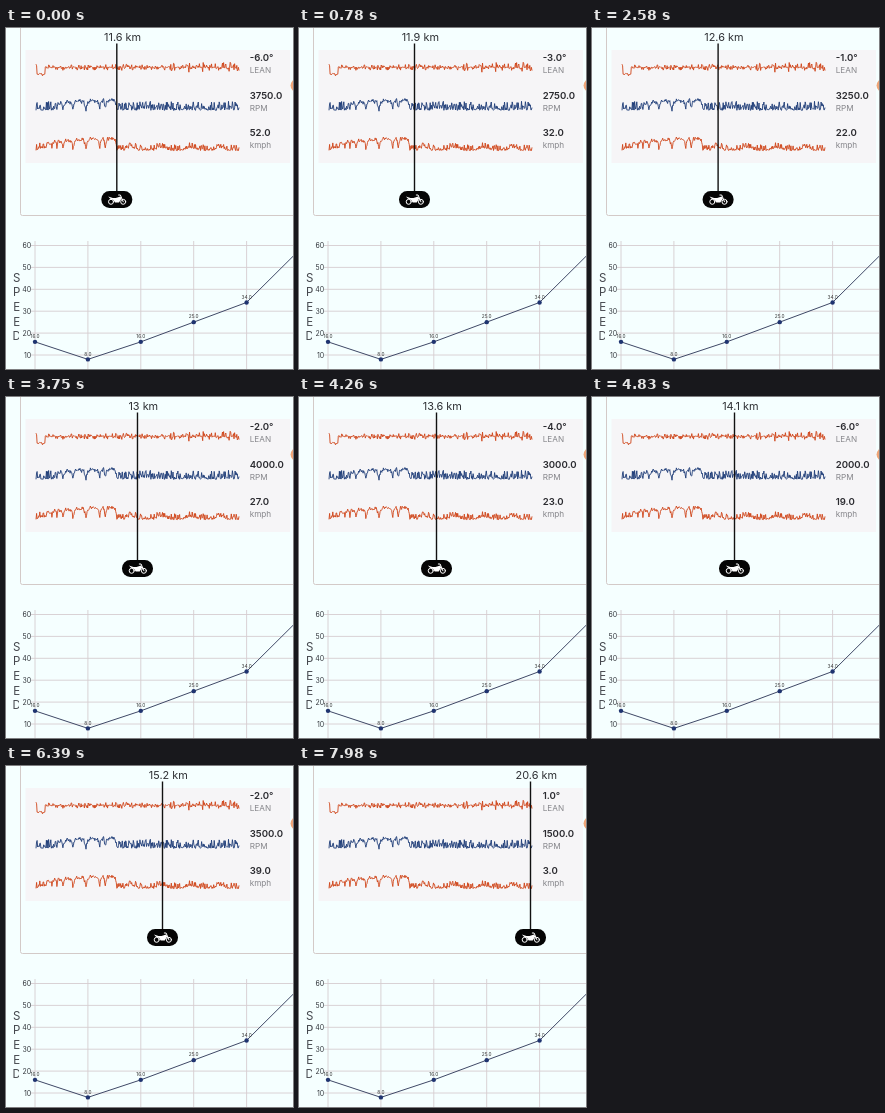
Recreate the animation shown at these times as an HTML page. Size 287 by 341 pixels, loop 8 s.

```html
<!DOCTYPE html>
<html lang="en">
<head>
<meta charset="utf-8">
<title>Ride telemetry</title>
<style>
  html, body { margin: 0; width: 100%; height: 100%; overflow: hidden; background: #f5ffff; }
  svg { display: block; width: 100vw; height: 100vh; font-family: Inter, Roboto, sans-serif; }
  .value { font-size: 9.6px; font-weight: 600; fill: #2b2b30; }
  .unit { font-size: 8.2px; fill: #85858a; }
  .km { font-size: 10.9px; fill: #2e3034; text-anchor: middle; }
  .tick { font-size: 7px; fill: #33373d; text-anchor: end; }
  .dot-label { font-size: 4.8px; fill: #333; text-anchor: middle; }
  .axis { font-size: 11.5px; fill: #45484e; text-anchor: middle; }
  .grid { stroke: #d6cdd1; stroke-width: .9; }
  .trace { fill: none; stroke-width: .9; stroke-linejoin: round; }
  .orange { stroke: #d0461a; }
  .navy { stroke: #1f3d78; }
</style>
</head>
<body>
<svg viewBox="0 0 287 341" preserveAspectRatio="none">
  <defs><clipPath id="cut"><rect x="0" y="300" width="13" height="13"/></clipPath></defs>
  <rect width="287" height="341" fill="#f5ffff"/>
  <path d="M14.5 0V185.5Q14.5 187.5 16.5 187.5H287" fill="none" stroke="#d3cac8"/>
  <rect x="19.5" y="22" width="264.5" height="113" fill="#f6f5f7"/>
  <circle cx="291" cy="57.5" r="6.5" fill="#f0a578"/>
  <g id="traces"></g>
  <g id="readout"></g>
  <g id="chart"></g>
  <g id="marker">
    <path d="M0 15.5V164" stroke="#111" stroke-width="1.4"/>
    <rect x="-15.5" y="163" width="31" height="17" rx="8.2" fill="#050505"/>
    <g fill="none" stroke="#fff" stroke-linecap="round">
      <circle cx="-5.8" cy="173.8" r="2.5"/>
      <circle cx="6.4" cy="173.8" r="2.5"/>
      <path d="M1.8 167H3.6L6.4 173.8"/>
    </g>
    <path d="M-8.6 168.6L-4 169.9H-1L3.6 168.4L4.8 170.5L2.2 174.6H-1.8L-3.4 172L-6.5 170.8Z" fill="#fff"/>
    <text class="km" id="km" x="5.8" y="12.5"></text>
  </g>
</svg>
<script>
const LOOP = 8000;
const START_X = 110.8;

// drags of the marker: [from ms, to ms, end x]
const drags = [
  [30, 780, 115.5], [1200, 1920, 121.5], [2010, 2700, 126.5], [2850, 3300, 128.5],
  [3450, 4230, 137.5], [4260, 4830, 142.5], [5070, 5850, 152.5], [5880, 6390, 156.5],
  [7020, 7170, 230.5], [7979, 7980, 231.5]
];

// readings along the ride: [x, km, lean, rpm, speed]
const ride = [
  [110.8, 11.6, -6, 3750, 52], [119.9, 12.1, 0, 1750, 13], [126.1, 12.6, -1, 3250, 22],
  [131.5, 13, -2, 4000, 27], [142.5, 14.1, -6, 2000, 19], [151.5, 14.8, -2, 3500, 41],
  [231.5, 20.6, 1, 1500, 3]
];

const $ = id => document.getElementById(id);
const clamp = u => Math.min(1, Math.max(0, u));
const smooth = u => u * u * (3 - 2 * u);

function markerX(t) {
  let x = START_X;
  for (const [from, to, end] of drags) x += (end - x) * smooth(clamp((t - from) / (to - from)));
  return x;
}

function readingsAt(x) {
  const i = Math.max(1, ride.findIndex(row => row[0] >= x));
  const a = ride[i - 1], b = ride[i];
  const u = clamp((x - a[0]) / (b[0] - a[0]));
  return a.map((v, k) => v + (b[k] - v) * u);
}

function add(parent, tag, attrs, text = "") {
  const el = document.createElementNS("http://www.w3.org/2000/svg", tag);
  for (const k in attrs) el.setAttribute(k, attrs[k]);
  el.textContent = text;
  parent.append(el);
  return el;
}

function random(seed) {
  return () => (seed = (seed * 16807) % 2147483647) / 2147483647;
}

function trace(cls, seed, height) {
  const rnd = random(seed);
  let d = "";
  for (let x = 30; x <= 233; x += .55)
    d += (d ? "L" : "M") + x.toFixed(1) + " " + height(x, rnd).toFixed(1);
  add($("traces"), "path", { class: "trace " + cls, d });
}

// flat-topped arches between sudden dips
const dips = [40, 46, 51, 57, 67, 80, 94, 99, 111];
function arch(x) {
  const i = dips.findIndex(d => d > x);
  if (i < 1) return 0;
  const u = (x - dips[i - 1]) / (dips[i] - dips[i - 1]);
  return (1 - Math.abs(2 * u - 1) ** 5) * Math.min(1, .55 + i * .07);
}

const spike = (rnd, power) => {
  const r = rnd() * 2 - 1;
  return Math.sign(r) * Math.abs(r) ** power;
};

trace("orange", 71, (x, rnd) => {
  if (x < 39) return (x < 31 ? 38 : 46) + spike(rnd, 2) * 1.8;
  return 39.3 + spike(rnd, 2.4) * (x > 165 ? 5 : 3.2);
});
trace("navy", 29, (x, rnd) => {
  if (x > 49 && x < 111) return 82 - arch(x) * 9.5 + spike(rnd, 1.5) * 2.2;
  return 82.3 - rnd() ** 1.6 * 9;
});
trace("orange", 53, (x, rnd) => {
  if (x > 40 && x < 111) return 122 - arch(x) * 11.5 + spike(rnd, 1.5) * 2;
  const swell = Math.max(0, Math.sin(x / 4.7)) * 2.5;
  return 122.6 - swell - rnd() ** 2 * 6;
});

const values = ["LEAN", "RPM", "kmph"].map((unit, i) => {
  const y = 33 + i * 37.5;
  add($("readout"), "text", { class: "unit", x: 243.7, y: y + 12 }, unit);
  return add($("readout"), "text", { class: "value", x: 243.7, y });
});

function buildChart() {
  const g = $("chart");
  const px = i => 29 + i * 52.9, py = v => 217.5 + (60 - v) * 2.19;
  for (let v = 60; v >= 10; v -= 10) {
    add(g, "path", { class: "grid", d: `M25 ${py(v)}H287` });
    add(g, "text", { class: "tick", x: 25.2, y: py(v) + 2.5 }, v);
  }
  for (let i = 0; i < 5; i++) add(g, "path", { class: "grid", d: `M${px(i)} 213V341` });
  const speeds = [16, 8, 16, 25, 34, 58];
  add(g, "polyline", {
    points: speeds.map((v, i) => px(i) + "," + py(v)).join(" "),
    fill: "none", stroke: "#3f4866", "stroke-width": 1
  });
  speeds.slice(0, 5).forEach((v, i) => {
    add(g, "circle", { cx: px(i), cy: py(v), r: 2.2, fill: "#1f3470" });
    add(g, "text", { class: "dot-label", x: px(i), y: py(v) - 3.8 }, v.toFixed(1));
  });
  [..."SPEED"].forEach((c, i) => add(g, "text", {
    class: "axis", x: 10.6, y: 253.5 + i * 14.7, ...(i === 4 && { "clip-path": "url(#cut)" })
  }, c));
}
buildChart();

const start = performance.now();

function draw() {
  const x = markerX((performance.now() - start) % LOOP);
  const [, km, lean, rpm, speed] = readingsAt(x);
  $("marker").setAttribute("transform", `translate(${x} 0)`);
  $("km").textContent = Math.round(km * 10) / 10 + " km";
  values[0].textContent = (Math.round(lean) || 0).toFixed(1) + "°";
  values[1].textContent = (Math.round(rpm / 250) * 250).toFixed(1);
  values[2].textContent = Math.round(speed).toFixed(1);
  requestAnimationFrame(draw);
}
draw();
</script>
</body>
</html>
```
